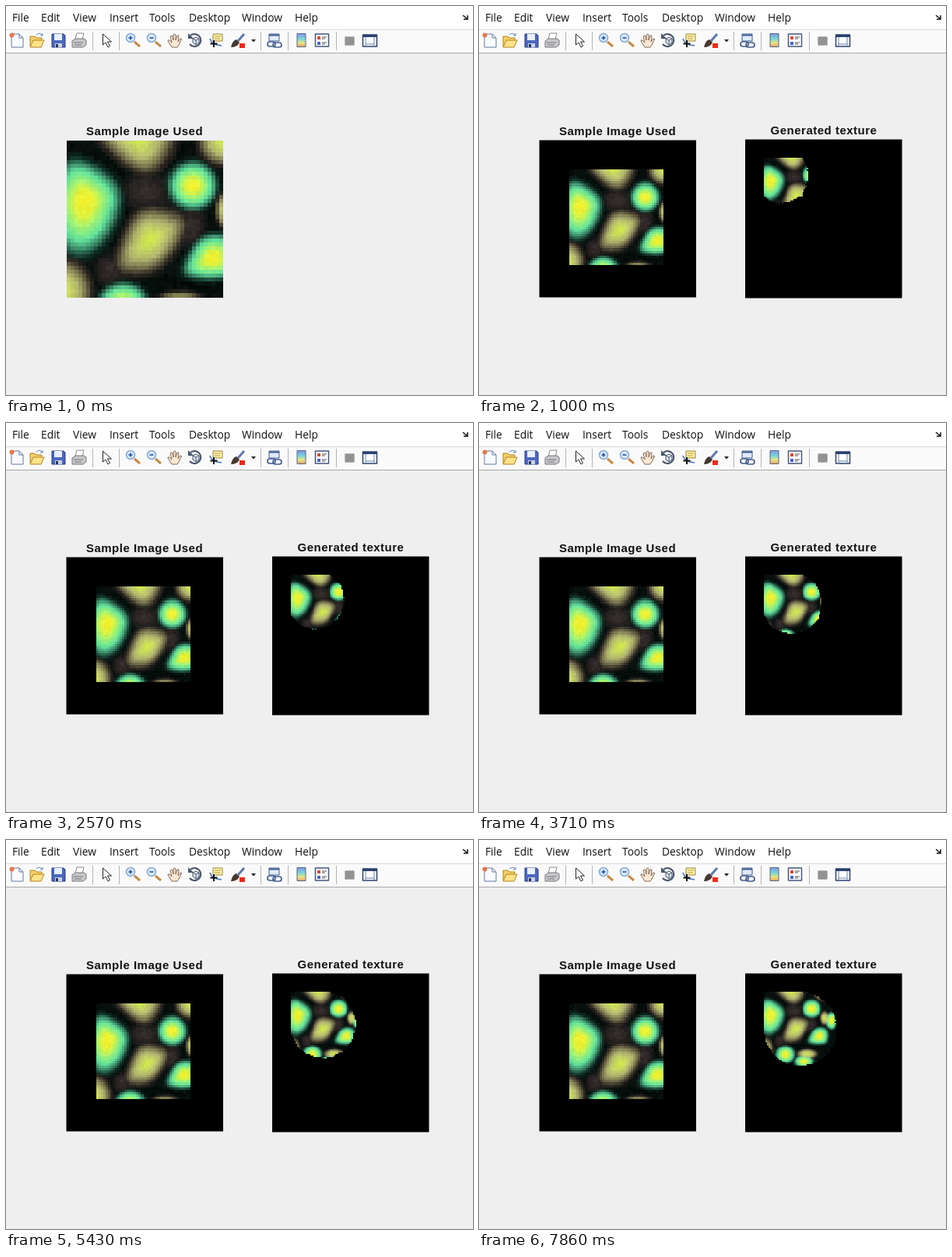
Animation of 600x500 px, one loop 8 s. Source, as an HTML page with a canvas:

```html
<!DOCTYPE html>
<html lang="en">
<head>
<meta charset="utf-8">
<title>Texture synthesis</title>
<style>
  html, body { margin: 0; width: 100%; height: 100%; overflow: hidden; background: #f0eff0; }
  svg, canvas { position: absolute; left: 0; top: 0; width: 600px; height: 500px; }
  .menu { font: 13.8px "Open Sans", "Noto Sans", sans-serif; fill: #111; }
  .title { font: bold 15px "Liberation Sans", Arial, sans-serif; letter-spacing: .5px; fill: #111; text-anchor: middle; }
</style>
</head>
<body>
<svg viewBox="0 0 600 500">
  <rect width="600" height="61" fill="#fff"/>
  <rect y="31" width="600" height="30" fill="#fafafa"/>
  <path d="M0 30.5H600" stroke="#d8d8d8"/>
  <path d="M0 60.5H600" stroke="#a8a8a8"/>
  <g class="menu" id="menu"></g>
  <path d="M587 12l5 4M593 12v5h-5" fill="none" stroke="#111" stroke-width="1.5"/>
  <path d="M111.500 33v24M145.500 33v24M327.500 33v24M362.500 33v24M424.500 33v24" stroke="#b4b4b4"/>

  <g stroke-linejoin="round" fill="none">
    <!-- new, open, save, print -->
    <path d="M7 36h10l5 5v12H7z" fill="#f9fbff" stroke="#6378a0"/>
    <path d="M17 36v5h5" stroke="#6378a0"/>
    <circle cx="7.500" cy="37.500" r="3" fill="#e8774a"/>
    <path d="M31 52V39h6l2 2h7v3" fill="#f4cf68" stroke="#b38420"/>
    <path d="M31 53l4-9h14l-4 9z" fill="#ffe28a" stroke="#b38420"/>
    <path d="M39 37q5-4 8 1m0-3v3h-3" stroke="#5b83bd"/>
    <path d="M59 36h15l2 2v15H59z" fill="#4a67c0" stroke="#263c85"/>
    <path d="M62 36h10v8H62z" fill="#e9effc"/>
    <path d="M63 48h9v5h-9z" fill="#cdd3e2"/>
    <path d="M64 49h3v4h-3z" fill="#26345f"/>
    <path d="M89 43l2-8h9l-2 8z" fill="#fff" stroke="#888"/>
    <path d="M85 45l4-3h11l3 2v6l-4 3H85z" fill="#c7c8cb" stroke="#777"/>
    <path d="M87 47h12M88 50h9" stroke="#777"/>
    <!-- pointer -->
    <path d="M124.500 36v14l3.500-3 3 6 2.500-1.500-3-5.500h5z" fill="#fff" stroke="#222"/>
    <!-- zoom -->
    <g id="lens">
      <path d="M165 46l7 6" stroke="#c58a45" stroke-width="3"/>
      <circle cx="160" cy="41" r="5.500" fill="#d9ebfc" stroke="#86a8d4" stroke-width="1.500"/>
      <path d="M157.500 41h5" stroke="#2251a5" stroke-width="1.600"/>
    </g>
    <use href="#lens" x="27"/>
    <path d="M160 38.500v5" stroke="#2251a5" stroke-width="1.600"/>
    <!-- pan -->
    <path d="M213 53l-5-8q0-2 2-1l3 3-2-8q1-2 3 0l1 5v-7q2-2 3 0v7l2-6q2-1 2 1l-1 7 3-4q3 0 1 2l-3 6-2 3z" fill="#fde7d2" stroke="#806a5c"/>
    <!-- rotate -->
    <path d="M237 38a8 8 0 1 1-1 11" stroke="#49566d" stroke-width="2.200"/>
    <path d="M234 35v7h7z" fill="#49566d"/>
    <path d="M240 42l4-2 4 2v5l-4 3-4-3zM240 42l4 2 4-2M244 44v6" fill="#dce4f1" stroke="#49566d"/>
    <!-- data tip -->
    <path d="M266 36h12v9h-12z" fill="#fff1a3" stroke="#9a8440"/>
    <path d="M268 39h8M268 42h7" stroke="#b29b52"/>
    <path d="M262 42q2 8 15 9" stroke="#4870c2" stroke-width="1.500"/>
    <path d="M267 44v9M262.500 48.500h9" stroke="#111" stroke-width="2"/>
    <!-- brush -->
    <path d="M298 45l8-9" stroke="#5c78ac" stroke-width="3"/>
    <path d="M289 53q2-9 7-10l4 4q-3 6-11 6z" fill="#46382f"/>
    <path d="M300 48h7v6h-7z" fill="#ee2a1b"/>
    <path d="M315 43h6l-3 3.500z" fill="#222"/>
    <!-- link -->
    <path d="M338 36h13v9h-13z" fill="#e1ebfa" stroke="#3f5a90"/>
    <path d="M338 37.500h13" stroke="#3f5a90" stroke-width="2"/>
    <rect x="336" y="46" width="10" height="6" rx="3" stroke="#465f8f" stroke-width="1.700"/>
    <rect x="343" y="47" width="11" height="6" rx="3" stroke="#465f8f" stroke-width="1.700"/>
    <!-- colour bar, legend -->
    <linearGradient id="bar" x2="0" y2="1">
      <stop stop-color="#8197e8"/><stop offset=".4" stop-color="#79d5d7"/>
      <stop offset=".7" stop-color="#e6e681"/><stop offset="1" stop-color="#e7a06a"/>
    </linearGradient>
    <path d="M374 35.500h11v17h-11z" fill="url(#bar)" stroke="#596580"/>
    <path d="M397.500 36h17v16h-17z" fill="#fff" stroke="#44577f" stroke-width="1.500"/>
    <path d="M400 39h4v4h-4z" fill="#e04632"/>
    <path d="M400 46h4v4h-4z" fill="#4a62d1"/>
    <path d="M406 40h6M406 42h4M406 47h6M406 49h4" stroke="#555"/>
    <!-- panels -->
    <rect x="435.500" y="39.500" width="12" height="11" rx="1" fill="#929292" stroke="#b5b5b5"/>
    <path d="M458.500 37h18v15h-18z" fill="#fff" stroke="#2b426f" stroke-width="1.500"/>
    <path d="M458 38.500h19" stroke="#2b426f" stroke-width="3"/>
    <path d="M462 40v12M473 40v12M462 49h11" stroke="#6780aa"/>
  </g>

  <text class="title" x="178" y="166">Sample Image Used</text>
  <text class="title" id="outTitle" x="443" y="165">Generated texture</text>
</svg>
<canvas id="stage" width="600" height="500"></canvas>

<script>
const LOOP = 8000, FPS = 7;
const SAMPLE = 40, SEED = 26, OUT = 80, SCALE = 1.906;

const MENU = { File: 8, Edit: 45, View: 86, Insert: 133, Tools: 184, Desktop: 235, Window: 303, Help: 371 };
document.getElementById("menu").innerHTML = Object.entries(MENU)
  .map(([label, x]) => `<text x="${x}" y="20">${label}</text>`).join("");

// Colour by relative distance from a cell's centre.
const RAMPS = {
  green: [[0, 246, 240, 42], [.25, 228, 242, 58], [.45, 160, 242, 118], [.66, 98, 226, 155],
          [.81, 62, 142, 108], [.97, 14, 42, 34], [1.12, 6, 14, 12]],
  tan: [[0, 208, 236, 64], [.28, 200, 216, 98], [.55, 180, 184, 112], [.77, 126, 122, 82],
        [1, 46, 40, 34], [1.2, 6, 14, 12]],
  dim: [[0, 56, 46, 46], [.6, 42, 36, 36], [1.3, 6, 14, 12]]
};

// A cell measures how far a point lies from its centre: 0 there, 1 on the outline.
function ellipse(kind, cx, cy, rx, ry) {
  return { kind, distance: (x, y) => Math.hypot((x - cx) / rx, (y - cy) / ry) };
}

function polygon(kind, cx, cy, points) {
  const edges = points.map(([x, y], i) => {
    const [nextX, nextY] = points[(i + 1) % points.length];
    const nx = nextY - y, ny = x - nextX, reach = nx * (x - cx) + ny * (y - cy);
    return [nx / reach, ny / reach];
  });
  return {
    kind,
    distance: (x, y) => edges.reduce((sum, [nx, ny]) =>
      sum + Math.max(0, nx * (x - cx) + ny * (y - cy)) ** 5, 0) ** .2
  };
}

const CELLS = [
  polygon("green", 4.7, 15.5, [[0, 2], [4.5, 2.5], [16, 11.5], [16.3, 17], [8.5, 30.5], [-1, 31.5], [-7, 16]]),
  polygon("tan", 18.5, -.5, [[5, -3], [17, 9], [22, 10], [28, 3.5], [29, -5], [8, -8]]),
  polygon("tan", 21.4, 25.2, [[17.5, 17], [21.5, 15.7], [32, 19.5], [28.5, 29], [22.5, 34.7], [11, 34], [11, 31]]),
  polygon("green", 37.5, 30, [[33.5, 23.3], [42, 22.8], [45, 28], [43, 35.8], [31, 36.5], [27.7, 34]]),
  ellipse("tan", 40, 0, 6.5, 6.5),
  ellipse("green", 32.2, 11.6, 6.9, 6.9),
  ellipse("green", 14.5, 42.3, 7.3, 6.7),
  ellipse("tan", -1.5, 38.5, 8, 8.5),
  ellipse("tan", 41, 17.8, 3, 4.8),
  ellipse("tan", 29, 42, 7, 3.4),
  ellipse("dim", 20.5, 13, 6, 5),
  ellipse("dim", 31.5, 22, 4, 5),
  ellipse("dim", 11, 33, 4, 4),
  ellipse("green", 45.5, 19.5, 4.4, 6.5),
  ellipse("green", 27, 47, 7.2, 5)
];

// Time and reach of the grown patch in screen pixels.
const GROWTH = [[140, 50], [290, 52], [1570, 62.5], [2290, 67], [3710, 75], [5430, 84], [7000, 91.5], [7860, 94.5], [8000, 95]];

function hash(x, y) {
  const s = Math.sin(x * 127.1 + y * 311.7) * 43758.5453;
  return s - Math.floor(s);
}

function interpolate(table, at) {
  const i = table.findIndex(row => row[0] > at);
  if (i < 0) return table.at(-1).slice(1);
  if (i === 0) return table[0].slice(1);
  const a = table[i - 1], b = table[i], k = (at - a[0]) / (b[0] - a[0]);
  return a.slice(1).map((v, n) => v + (b[n + 1] - v) * k);
}

// Each channel takes its brightest cell, so neighbours blend in the gaps.
function textureColor(x, y) {
  const noise = (hash(x, y) - .5) * 10;
  return CELLS
    .map(cell => interpolate(RAMPS[cell.kind], cell.distance(x + .5, y + .5)))
    .reduce((top, color) => top.map((v, n) => Math.max(v, color[n])))
    .map(v => Math.round(Math.max(0, Math.min(255, v + noise))));
}

const colors = Array.from({ length: OUT * OUT }, (_, i) => `rgb(${textureColor(i % OUT, Math.floor(i / OUT))})`);

function paintTexture(size, visible = () => true) {
  const canvas = document.createElement("canvas");
  canvas.width = canvas.height = size;
  const g = canvas.getContext("2d");
  for (let y = 0; y < size; y++) for (let x = 0; x < size; x++) {
    if (!visible(x, y)) continue;
    g.fillStyle = colors[y * OUT + x];
    g.fillRect(x, y, 1, 1);
  }
  return canvas;
}

// The seed square plus a disc through two of its corners that reaches a given extent.
function grownPatch(time) {
  const [reach] = interpolate(GROWTH, time);
  const corner = 50 + Math.max(0, reach - 62) * .1;
  const centre = corner - reach + Math.sqrt(2 * reach * (reach - corner));
  const radius = reach - centre;
  return (x, y) => (x < SEED && y < SEED) ||
    Math.hypot((x + .5) * SCALE - centre, (y + .5) * SCALE * .98 - centre) < radius - hash(x + 3, y) * 1.4;
}

const ctx = document.getElementById("stage").getContext("2d");
ctx.imageSmoothingEnabled = false;
const outTitle = document.getElementById("outTitle");
const sample = paintTexture(SAMPLE);
let shown = -1;

function draw(step) {
  ctx.clearRect(0, 0, 600, 500);
  outTitle.style.display = step ? "" : "none";
  if (!step) {
    ctx.drawImage(sample, 77.5, 172.5, 201.5, 202);
    return;
  }
  ctx.fillStyle = "#000";
  ctx.fillRect(77.5, 172.5, 201.5, 202);
  ctx.fillRect(342, 171.5, 201.5, 204);
  ctx.drawImage(sample, 116, 210, 121, 123);
  const patch = paintTexture(OUT, grownPatch(step * 1000 / FPS + 4));
  ctx.drawImage(patch, 366, 195, OUT * SCALE, OUT * SCALE);
}

function tick() {
  const time = performance.now() % LOOP;
  const step = Math.min(LOOP / 1000 * FPS - 1, Math.floor(time * FPS / 1000 + .025));
  if (step !== shown) draw(shown = step);
  requestAnimationFrame(tick);
}
tick();
</script>
</body>
</html>
```
